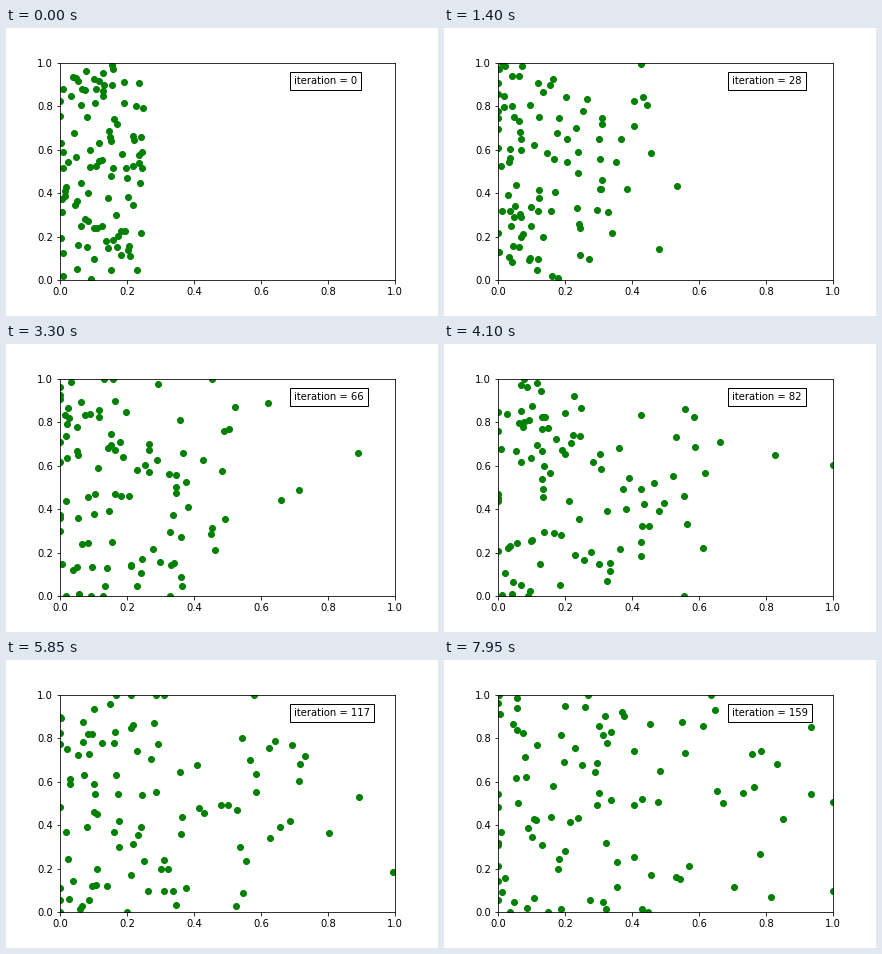
Animation, 432 px wide and 288 px high, one loop 8000 ms. Source, as a matplotlib script:

```python
import numpy as np
import matplotlib.pyplot as plt
from matplotlib.animation import FuncAnimation

COUNT = 100        # particles
FRAMES = 160
INTERVAL = 50      # ms per iteration
START_WIDTH = 0.25  # particles begin in this left-hand strip
STEP = 0.031       # standard deviation of one step


def diffuse(seed):
    """Random walk of all particles, held inside the unit square by its walls."""
    rng = np.random.default_rng(seed)
    path = np.empty((FRAMES, COUNT, 2))
    path[0] = rng.random((COUNT, 2)) * [START_WIDTH, 1]
    for i in range(1, FRAMES):
        step = rng.normal(0, STEP, (COUNT, 2))
        path[i] = np.clip(path[i - 1] + step, 0, 1)
    return path


path = diffuse(7)

plt.rcParams["font.family"] = "DejaVu Sans"
plt.rcParams["font.size"] = 10
fig, ax = plt.subplots(figsize=(6, 4), dpi=72)
fig.subplots_adjust(left=0.125, right=0.9, bottom=0.125, top=0.88)
ax.set_xlim(0, 1)
ax.set_ylim(0, 1)

dots, = ax.plot([], [], "o", color="green", markersize=6)
label = ax.text(0.7, 0.9, "", bbox={"facecolor": "white"})


def draw(i):
    dots.set_data(path[i, :, 0], path[i, :, 1])
    label.set_text(f"iteration = {i}")
    return dots, label


anim = FuncAnimation(fig, draw, frames=FRAMES, init_func=lambda: draw(0),
                     interval=INTERVAL, repeat=True, repeat_delay=0)
plt.show()
```
